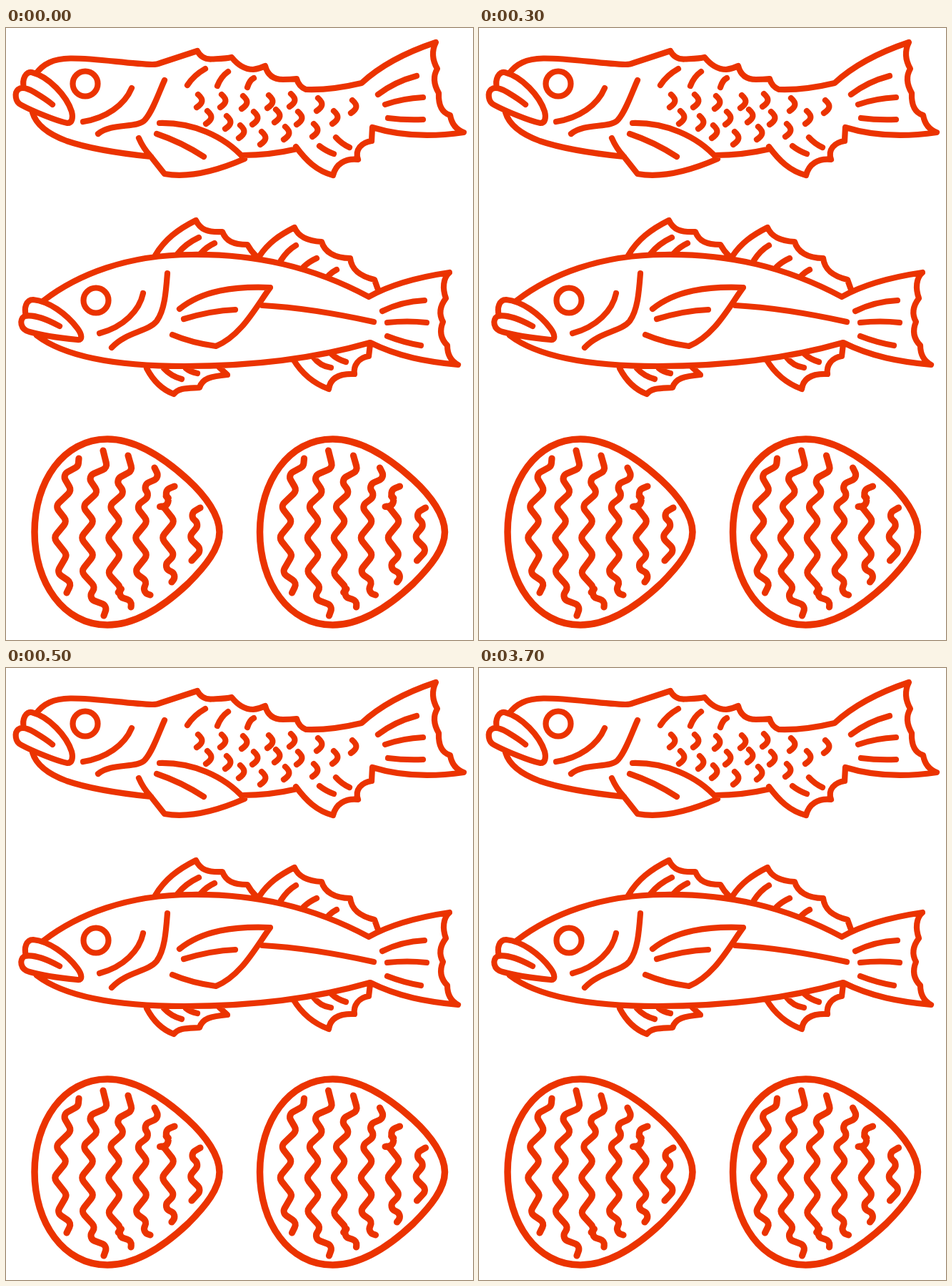
These frames come from a looping animation (654x856 px, 5700 ms). An HTML page with a canvas:

```html
<!DOCTYPE html>
<html lang="en">
<head>
<meta charset="utf-8">
<title>Fish and shells</title>
<style>
  html, body { margin: 0; width: 100%; height: 100%; overflow: hidden; background: #fff; }
  canvas { display: block; }
</style>
</head>
<body>
<canvas id="stage" width="654" height="856"></canvas>
<script>
const ctx = document.getElementById('stage').getContext('2d');
const LOOP = 5700, STEP = 100, WIGGLE_START = 200, WIGGLE_END = 700;

function outline(...parts) {
  const path = new Path2D();
  parts.forEach(part => path.addPath(new Path2D(part)));
  return path;
}

function addEye(path, x, y) {
  path.moveTo(x + 17.5, y);
  path.arc(x, y, 17.5, 0, Math.PI * 2);
}

// Upper fish
const carp = outline(
  // back and tail
  `M42 64C52 50 66 43 90 42.5C125 42 170 50 205 51Q212 51 216 49L268 32
   C272 40 278 44 288 43.5C298 43 308 43 316 41C324 51 334 58 346 58Q355 57 363 53
   C366 65 374 72 388 72Q398 72 407 71Q410 82 420 86C447 87 473 83 498 77
   C525 52 560 34 602 20Q593 38 604 57Q595 72 606 91Q605 117 622 122Q625 140 641 146
   C600 152 555 152 513 139L512 158`,
  // belly and lower fins
  `M512 158C498 160 488 170 493 184C475 182 462 190 458 206C435 200 420 185 406 166
   M331 178C357 178 382 175 408 169M37 118C42 135 58 148 85 158C120 170 165 176 203 180
   M186 154Q192 168 203 180L222 204C255 210 295 200 334 183C305 150 260 132 215 133
   M211 148C235 156 257 167 277 180M439 165Q448 172 459 176M462 153Q470 162 481 167`,
  // mouth, cheek, gill
  `M25 83C22 72 28 60 36 62C60 68 85 95 92 117C94 125 93 133 86 133
   C70 130 35 115 22 108C12 104 12 90 17 86C22 82 30 84 40 90C50 96 58 101 65 107
   M176 84C166 108 140 126 108 131M222 73C213 93 206 115 195 128C185 141 148 132 129 148`,
  // back and tail dashes
  `M279 57Q263 66 254 80M311 61Q301 68 296 81M347 70Q341 73 338 83
   M521 93C538 80 556 72 575 67M531 107C548 101 565 98 584 97M535 126Q558 129 584 128`
);
addEye(carp, 111, 78);

const scales = [
  [272, 102], [305, 102], [335, 104], [371, 103], [402, 101], [440, 107], [488, 110],
  [285, 125], [312, 132], [350, 126], [381, 123], [412, 126], [462, 125],
  [331, 145], [361, 154], [394, 147], [434, 143]
];
scales.forEach(([x, y]) => carp.addPath(new Path2D(`M${x - 3} ${y - 9}c8 7 7 12 -2 18`)));

// Middle fish
const bass = outline(
  // body and tail
  `M53 381C100 345 170 317 260 317C350 316 430 334 508 376C540 358 580 348 621 342
   C612 350 611 364 616 378Q603 395 612 411Q604 430 618 444Q618 463 633 471
   C590 467 550 460 510 440C430 463 340 473 250 473C165 473 85 462 43 430
   M527 396C545 387 565 382 586 381M534 412Q562 409 589 412M534 431Q557 440 581 444`,
  // mouth, cheek, gill, side fin
  `M28 402C25 392 28 380 38 380C60 382 85 400 100 420C106 428 108 437 100 436
   C80 434 50 430 33 425C20 422 18 408 26 403C40 400 58 408 75 417
   M192 371C187 395 165 418 131 427M226 343C224 370 222 395 211 410C199 425 168 425 148 447
   M243 393C275 367 320 361 370 363C350 390 330 430 294 445C272 442 252 437 233 429
   M249 407C272 400 295 395 321 394M359 388C415 391 465 400 515 411`,
  // top fins
  `M209 318C222 296 240 282 266 269C272 282 282 286 303 285C308 298 318 303 338 303Q343 312 351 320
   M270 293C257 299 248 306 240 316M292 301Q281 306 273 315
   M355 319C367 301 382 290 404 279C409 291 422 298 442 299C446 313 460 322 482 322
   C484 338 495 347 516 352L521 366
   M406 304Q394 311 385 325M435 322Q424 327 417 334M463 338Q457 341 452 346`,
  // bottom fins
  `M197 476C207 495 219 506 235 512C242 503 254 504 271 503C275 490 287 487 310 485L299 475
   M221 476Q231 487 246 491M252 476Q258 481 268 483
   M402 463C414 483 430 497 452 505C454 490 466 483 488 484C486 472 494 461 508 459L510 442
   M431 461Q440 473 455 475M456 456Q463 463 476 467`
);
addEye(bass, 126, 381);

// Shells
const shell = outline(
  `M142 575C180 575 220 600 255 632C280 655 299 682 299 705C299 728 280 752 255 777
   C220 810 180 835 142 835C80 835 40 775 40 705C40 635 80 575 142 575Z`
);
const ribs = new Path2D();

function addRib(points) {
  ribs.moveTo(...points[0]);
  for (let i = 1; i < points.length - 1; i++) ribs.arcTo(...points[i], ...points[i + 1], 8);
  ribs.lineTo(...points[points.length - 1]);
}

// The long ribs share the same zigzag in the middle.
function addLongRib(x, top, bottom) {
  addRib([...top, [x + 1, 669], [x + 17.5, 690], [x - 1.5, 713], [x + 17.5, 737], ...bottom]);
}

addLongRib(68, [[102, 602], [101, 613], [79, 625], [92, 647]], [[71, 762], [92, 776], [85, 790]]);
addLongRib(106, [[136, 591], [142, 615], [114, 627], [129, 649]],
  [[105, 760], [125, 782], [115, 798], [142, 808], [137, 822]]);
addLongRib(143, [[171, 598], [177, 619], [153, 632], [166, 650]],
  [[142, 762], [162, 784], [153, 794], [176, 801], [175, 810]]);
addLongRib(181, [[208, 615], [215, 629], [190, 640], [202, 654]], [[179, 761], [198, 774], [190, 789], [202, 793]]);
addLongRib(219, [[236, 641], [217, 649], [239, 667]], [[218, 755], [241, 764], [232, 775]]);
addRib([[272, 671], [255, 681], [271, 694], [256, 712], [274, 730], [260, 745]]);

// Draws a part at x offset; when tilted, turns it about its pivot and shifts it.
function draw(tilted, { x = 0, pivot, angle, shift = [0, 0], strokes }) {
  ctx.save();
  ctx.translate(x, 0);
  if (tilted) {
    ctx.translate(pivot[0] + shift[0], pivot[1] + shift[1]);
    ctx.rotate(angle * Math.PI / 180);
    ctx.translate(-pivot[0], -pivot[1]);
  }
  strokes.forEach(([path, width]) => {
    ctx.lineWidth = width;
    ctx.stroke(path);
  });
  ctx.restore();
}

const shellStrokes = [[shell, 9.5], [ribs, 9.2]];
const shellPivot = [136.5, 706.5];
const parts = [
  { pivot: [330, 30], angle: -2.6, strokes: [[carp, 8.2]] },
  { pivot: [330, 391], angle: 5.3, strokes: [[bass, 8.2]] },
  { pivot: shellPivot, angle: -7.7, shift: [8.5, 5.5], strokes: shellStrokes },
  { x: 315.5, pivot: shellPivot, angle: 3.1, shift: [-3.5, -17], strokes: shellStrokes }
];

function render() {
  const time = performance.now() % LOOP;
  const wiggling = time >= WIGGLE_START && time < WIGGLE_END;
  const tilted = wiggling && Math.floor((time - WIGGLE_START) / STEP) % 2 === 0;
  ctx.fillStyle = '#fff';
  ctx.fillRect(0, 0, 654, 856);
  ctx.strokeStyle = '#eb3300';
  ctx.lineCap = ctx.lineJoin = 'round';
  parts.forEach(part => draw(tilted, part));
  requestAnimationFrame(render);
}
render();
</script>
</body>
</html>
```
